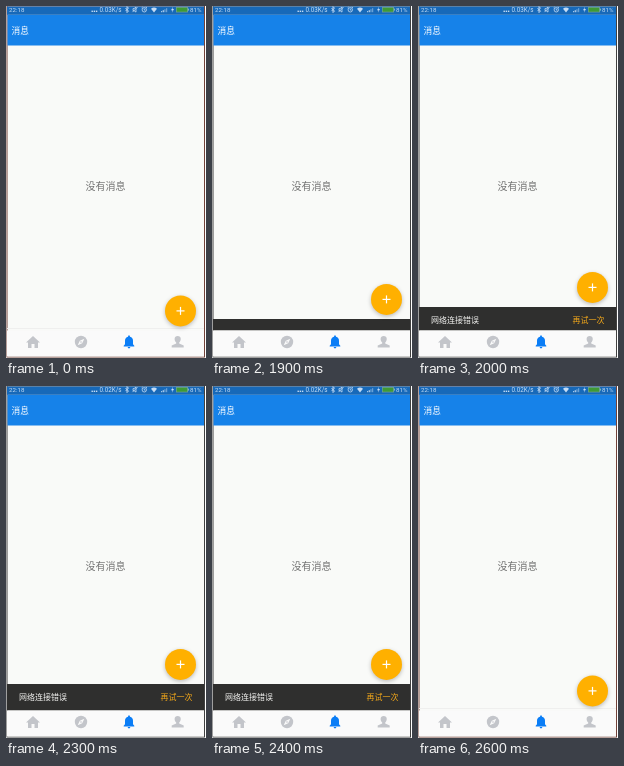
An HTML page with a canvas for the animation above (2.7 s loop, 200 px wide and 352 px high).

```html
<!DOCTYPE html>
<html lang="zh">
<head>
<meta charset="utf-8">
<style>
html, body { margin: 0; width: 100%; height: 100%; overflow: hidden; background: #fff; }
canvas { display: block; width: 200px; height: 352px; }
</style>
</head>
<body>
<canvas id="stage"></canvas>
<script>
const canvas = document.getElementById('stage');
const ctx = canvas.getContext('2d');
const ratio = window.devicePixelRatio || 1;
canvas.width = 200 * ratio;
canvas.height = 352 * ratio;

const LOOP = 2700;
const STEP = 100;
const BLUE = '#1682e9';
const BELL = '#0a7df6';
const GREY = '#c3c5ca';
const AMBER = '#ffb000';
const PAPER = '#f9faf8';
const CJK = '"Noto Sans CJK SC", "Noto Sans CJK", sans-serif';
const LATIN = 'Roboto, sans-serif';
const NAV_TOP = 324.5;

// Snackbar height at each step, from the moment it appears
const SNACK_START = 1900;
const SNACK_HEIGHTS = [11.5, 23.5, 26.5, 26.5, 26.5, 26.5, 7];

function rect(x, y, w, h, color) {
  ctx.fillStyle = color;
  ctx.fillRect(x, y, w, h);
}

function disc(x, y, r, color) {
  ctx.fillStyle = color;
  ctx.beginPath();
  ctx.arc(x, y, r, 0, Math.PI * 2);
  ctx.fill();
}

function shape(path, x, y, color) {
  ctx.save();
  ctx.translate(x, y);
  ctx.fillStyle = color;
  ctx.fill(new Path2D(path));
  ctx.restore();
}

function outline(path, x, y, color, width) {
  ctx.save();
  ctx.translate(x, y);
  ctx.strokeStyle = color;
  ctx.lineWidth = width;
  ctx.stroke(new Path2D(path));
  ctx.restore();
}

function label(text, x, y, size, color, { family = CJK, align = 'left', weight = 400 } = {}) {
  ctx.font = `${weight} ${size}px ${family}`;
  ctx.textAlign = align;
  ctx.textBaseline = 'alphabetic';
  ctx.fillStyle = color;
  ctx.fillText(text, x, y);
}

function drawStatus(rate) {
  const pale = '#c4dcf5';
  const latin = { family: LATIN };
  rect(1, 0.5, 197, 8.3, '#1769b9');
  label('22:18', 3, 6.2, 6.2, pale, latin);
  for (let i = 0; i < 3; i++) rect(85.5 + i * 2.2, 4.6, 1.4, 1.4, pale);
  label(`${rate}K/s`, 93.5, 6.2, 6.3, pale, latin);
  outline('M-1.5-1.5L1.5 1.5L0 3V-3L1.5-1.5L-1.5 1.5', 121, 3.6, pale, 0.9);
  outline('M-2-1V1H-1L1 2.5V-2.5L-1-1ZM-2.5 2.5L2.5-2.5', 129, 3.6, pale, 0.8);
  outline('M2.2 0A2.2 2.2 0 1 1-2.2 0A2.2 2.2 0 1 1 2.2 0M0-1.2V.3H1.2M-2.7-2L-1.6-2.8M2.7-2L1.6-2.8', 138.3, 3.8, pale, 0.8);
  shape('M-3-1Q0-3.4 3-1L0 2.6Z', 148, 3.8, pale);
  for (let i = 0; i < 4; i++) rect(155 + i * 1.7, 5.2 - i, 1.1, 1 + i, i < 2 ? pale : '#72a7da');
  shape('M.6-3L-1.5.6H0L-.6 3L1.5-.6H0Z', 166.5, 3.7, pale);
  rect(170, 1, 12, 5.4, '#6f9f9a');
  rect(170.7, 1.7, 10.4, 4, '#3f9a35');
  rect(182, 2.6, 0.9, 2, '#92c2b0');
  label('81%', 184, 6.2, 6.2, pale, latin);
}

function drawNav(resting) {
  rect(1, NAV_TOP, 197, 26, '#fafafa');
  if (resting) rect(1, 322, 197, 1, '#efefee');
  shape('M0-6L7 .5H5V6H1.5V2H-1.5V6H-5V.5H-7Z', 27, 336, GREY);
  disc(75, 336, 6.2, GREY);
  shape('M3.3-3.3L1.2 1.2L-3.3 3.3L-1.2-1.2Z', 75, 336, '#fafafa');
  disc(75, 336, 0.8, GREY);
  shape('M0-6.5Q1-6.5 1-5Q4-4.2 4-1V2.5L5.3 4V4.7H-5.3V4L-4 2.5V-1Q-4-4.2-1-5Q-1-6.5 0-6.5ZM-1.4 5.3H1.4Q1.2 6.7 0 6.7Q-1.2 6.7-1.4 5.3Z', 123, 335.7, BELL);
  shape('M0-6C4-6 3.6-1.2 1.5.6V1.5L6 3.5V5.6H-6V3.5L-1.5 1.5V.6C-3.6-1.2-4-6 0-6Z', 171.7, 336, GREY);
}

function drawFab(y) {
  ctx.save();
  ctx.shadowColor = 'rgba(0,0,0,.25)';
  ctx.shadowBlur = 4 * ratio;
  ctx.shadowOffsetY = 1.5 * ratio;
  disc(174.5, y, 15.5, AMBER);
  ctx.restore();
  rect(170.5, y - 0.6, 8, 1.2, '#fff');
  rect(173.9, y - 4, 1.2, 8, '#fff');
}

function drawSnackbar(height, open) {
  const top = NAV_TOP - height;
  rect(1, top, 197, height, '#2f2f2e');
  if (!open) return;
  label('网络连接错误', 13, top + 15.9, 8, '#f4f4f2', { weight: 500 });
  label('再试一次', 186.5, top + 15.9, 8, '#f5a91a', { align: 'right', weight: 500 });
}

function draw(time) {
  const step = Math.floor((time - SNACK_START) / STEP);
  const height = SNACK_HEIGHTS[step] || 0;
  const warmEdge = time < 800 || time >= 2600;

  ctx.setTransform(ratio, 0, 0, ratio, 0, 0);
  rect(0, 0, 200, 352, '#fff');
  rect(0.5, 0, 198.5, 351.5, warmEdge ? '#714239' : '#414141');
  rect(1.5, 0.5, 196.5, 350, PAPER);
  rect(1.5, 8.8, 196.5, 30.7, BLUE);
  drawStatus(time < 2200 ? '0.03' : '0.02');
  label('消息', 5.5, 27.5, 8.7, '#fff', { weight: 500 });
  label('没有消息', 99.5, 183.8, 10, '#707070', { align: 'center' });
  if (height) drawSnackbar(height, step >= 1 && step <= 5);
  drawNav(!height);
  drawFab(304.9 - height);
}

function tick(now) {
  draw(now % LOOP);
  requestAnimationFrame(tick);
}
requestAnimationFrame(tick);
</script>
</body>
</html>
```
